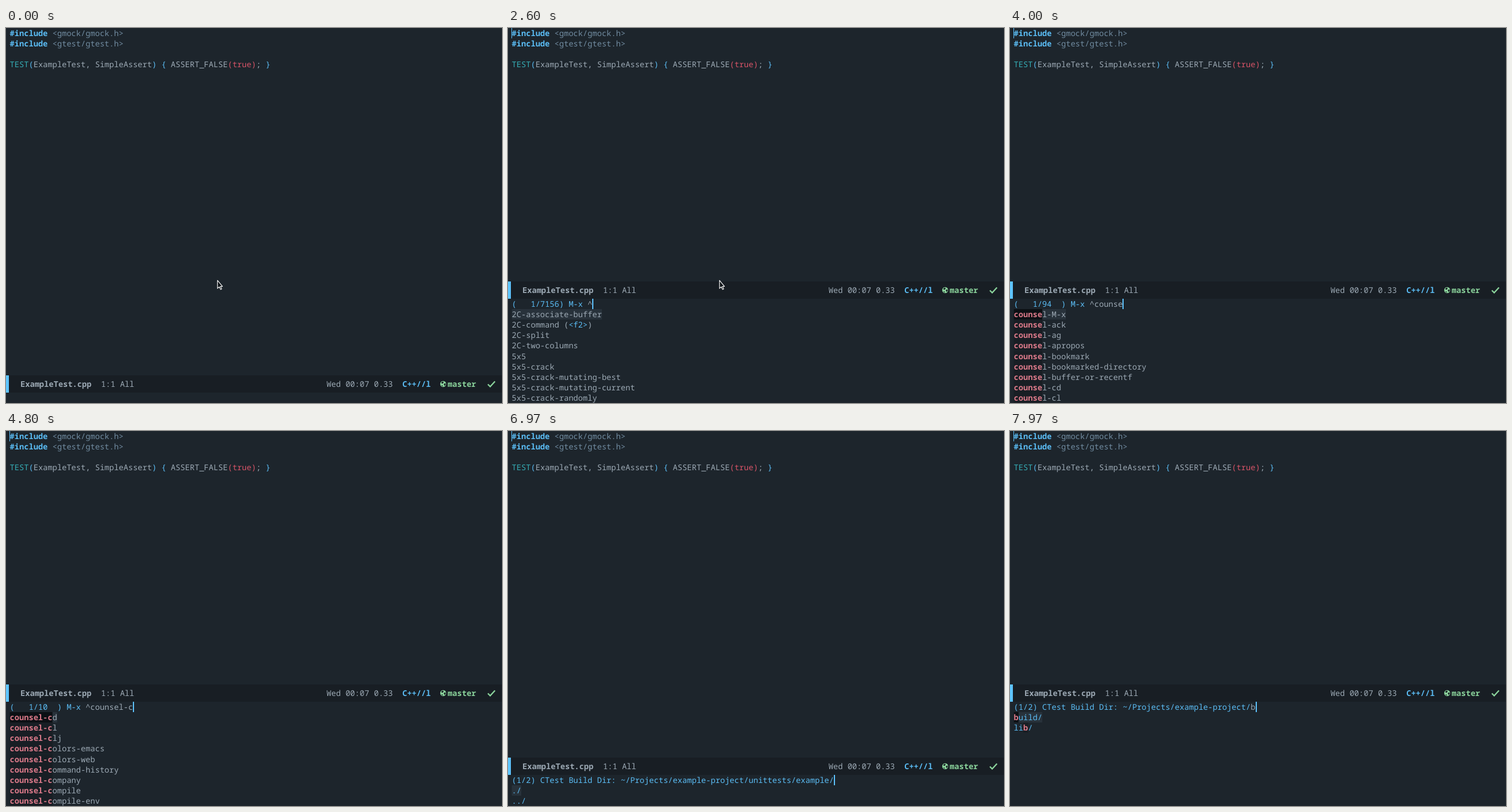
An HTML page that plays this animation: 860x651 px, repeating every 8000 ms.

```html
<!DOCTYPE html>
<html lang="en">
<head>
<meta charset="utf-8">
<title>Editor session</title>
<style>
html, body { margin: 0; width: 100%; height: 100%; overflow: hidden; background: #1d252c; }
svg { display: block; }
text {
  font: 13.7px "Noto Sans Mono", "Liberation Mono", monospace;
  font-variant-ligatures: none;
  text-rendering: geometricPrecision;
  white-space: pre;
}
.fg { fill: #9ca9b4; }
.blue { fill: #5bbdf5; }
.dim { fill: #718ca1; }
.teal { fill: #35acb4; }
.red { fill: #d95468; }
.green { fill: #8bd49c; }
.pink { fill: #dc7a8a; }
.bold { font-weight: 600; }
</style>
</head>
<body>
<svg id="stage" width="860" height="651" viewBox="0 0 860 651">
  <rect width="860" height="651" fill="#1d252c"/>
  <g id="code"></g>
  <rect id="point" x="6" y="0" height="18" fill="#5ec4ff"/>
  <g id="bar">
    <rect width="860" height="30" fill="#181e24"/>
    <rect width="5" height="30" fill="#5ec4ff"/>
    <g id="labels"></g>
    <circle cx="758" cy="15" r="5.2" fill="#8bd49c"/>
    <path d="M754.5 12.5l3-2 1.5 1.5-2 2.5-1.5-.5zM759 15l3-1.5.5 2.5-2 2.5zM755 17l2 .5.5 2-1.5-.5z" fill="#181e24"/>
    <path d="M835.5 15.5l4 4 8.3-9" fill="none" stroke="#8bd49c" stroke-width="2.3"/>
  </g>
  <g id="mini"></g>
  <rect id="caret" width="2" height="18" fill="#5ec4ff"/>
  <path id="mouse" d="M366.7 438.2V452.2L369.8 449.4L372.2 454L374 453.1L371.8 448.6H375.4Z"
    fill="#11161a" stroke="#fff" stroke-width="1.1" stroke-linejoin="round"/>
</svg>
<script>
const LOOP = 8000, LEFT = 6.6, PITCH = 8.22, ROW = 18.1, BASE = 14;
const $ = id => document.getElementById(id);
const esc = s => s.replace(/&/g, "&amp;").replace(/</g, "&lt;");

// A line is a list of [text, classes] pairs.
const line = (x, y, parts) => `<text x="${x}" y="${y}">` +
  parts.map(([s, c]) => `<tspan class="${c}">${esc(s)}</tspan>`).join("") + "</text>";
const box = (col, n, y, fill) =>
  `<rect x="${LEFT + col * PITCH}" y="${y}" width="${n * PITCH}" height="18" fill="${fill}"/>`;

const include = lib => [["#include", "blue bold"], [` <${lib}.h>`, "dim"]];
const source = [
  include("gmock/gmock"),
  include("gtest/gtest"),
  [],
  [["TEST", "teal"], ["(", "blue"], ["ExampleTest, SimpleAssert", "fg"], [")", "blue"],
   [" { ", "blue"], ["ASSERT_FALSE", "fg"], ["(true)", "red"], ["; ", "fg"], ["}", "blue"]]
];
$("code").innerHTML = source.map((p, i) => line(LEFT, Math.round(i * ROW) + BASE, p)).join("");
$("labels").innerHTML = [
  [25, "ExampleTest.cpp", "fg bold"], [164.8, "1:1 All", "fg"], [555.8, "Wed 00:07 0.33", "fg"],
  [687.2, "C++//l", "blue bold"], [765.8, "master", "green bold"]
].map(([x, s, c]) => line(x, 20, [[s, c]])).join("");

const all = ["2C-associate-buffer", "2C-command (<f2>)", "2C-split", "2C-two-columns", "5x5",
  "5x5-crack", "5x5-crack-mutating-best", "5x5-crack-mutating-current", "5x5-crack-randomly"];
const startC = ["c++-mode", "c-mode", "c-set-style", "calc", "calculator", "calendar",
  "capitalize-region", "cd", "center-line"];
const startCo = ["ConTeXt-mode (context-mode)", "column-number-mode", "comint-accumulate",
  "comint-append-output-to-file", "comint-backward-matching-input", "comint-bol",
  "comint-bol-or-process-mark", "comint-clear-buffer", "comint-continue-subjob"];
const counsel = ["M-x", "ack", "ag", "apropos", "bookmark", "bookmarked-directory",
  "buffer-or-recentf", "cd", "cl"].map(s => "counsel-" + s);
const counselC = ["d", "l", "lj", "olors-emacs", "olors-web", "ommand-history",
  "ompany", "ompile", "ompile-env"].map(s => "counsel-c" + s);
const ctest = ["counsel-ctest"];

const command = (at, input, total, items) => ({
  at, input: "^" + input, match: input, items, rows: 10,
  prompt: `(   1/${String(total).padEnd(4)}) M-x `
});
const folder = (at, path, items, rows, input = "") => ({
  at, input, match: input, items, rows,
  prompt: `(1/${items.length}) CTest Build Dir: ~/Projects/example-project/${path}`
});

const states = [
  { at: 0, rows: 1 },
  command(2600, "", 7156, all),
  command(3370, "c", 711, startC),
  command(3470, "co", 307, startCo),
  command(3640, "cou", 98, counsel),
  command(3740, "coun", 96, counsel),
  command(3840, "couns", 94, counsel),
  command(3940, "counse", 94, counsel),
  command(4040, "counsel", 94, counsel),
  command(4300, "counsel-", 93, counsel),
  command(4600, "counsel-c", 10, counselC),
  command(4870, "counsel-ct", 1, ctest),
  command(5010, "counsel-cte", 1, ctest),
  command(5160, "counsel-ctes", 1, ctest),
  command(5370, "counsel-ctest", 1, ctest),
  { ...command(5870, "counsel-ctest", 1, ctest), home: true },
  folder(6010, "unittests/example/", ["./", "../"], 3),
  folder(7140, "unittests/", ["./", "../", "example/"], 4),
  folder(7400, "", ["./", "../", ".git/", "build/", "example/", "lib/", "src/", "test/", "unittests/"], 10),
  folder(7700, "", ["build/", "lib/"], 10, "b")
];
const hidden = [[0, 170], [670, 1170], [1670, 2170], [3140, 3370], [6510, 6970]];

function candidate(s, i, y, match) {
  const tone = s.endsWith("/") ? "blue" : "fg";
  const at = match ? s.toLowerCase().indexOf(match) : -1;
  let out = i ? "" : box(0, s.length, y, "#28323b");
  let parts;
  if (at < 0) {
    parts = s.split(/(<.*?>)/).map(p => [p, p[0] === "<" ? "blue" : tone]);
  } else {
    const end = at + match.length;
    out += box(at, match.length, y, i ? "#181e24" : "#0c1014");
    parts = [[s.slice(0, at), tone], [s.slice(at, end), "pink bold"], [s.slice(end), tone]];
  }
  return out + line(LEFT, y + BASE, parts);
}

let shown;
function layout(state) {
  const top = Math.round(651 - state.rows * ROW);
  $("bar").setAttribute("transform", `translate(0 ${top - 30})`);
  const active = !!state.prompt;
  $("point").setAttribute("width", active ? 1 : 2);
  $("mini").innerHTML = active ? line(LEFT, top + BASE, [[state.prompt, "blue"], [state.input, "fg"]]) +
    state.items.map((s, i) => candidate(s, i, Math.round(top + (i + 1) * ROW), state.match)).join("") : "";
  if (active) {
    const col = state.home ? 0 : state.prompt.length + state.input.length;
    $("caret").setAttribute("x", Math.round(LEFT - 0.2 + col * PITCH));
    $("caret").setAttribute("y", top);
  }
}

const show = (id, on) => $(id).setAttribute("visibility", on ? "visible" : "hidden");
function draw(t) {
  const state = states.filter(s => s.at <= t).pop();
  if (state !== shown) layout(shown = state);
  const lit = !hidden.some(([a, b]) => t >= a && t < b);
  show("point", state.prompt || lit);
  show("caret", state.prompt && lit);
  show("mouse", t < 3370);
}

const start = performance.now();
function tick() {
  draw((performance.now() - start) % LOOP);
  requestAnimationFrame(tick);
}
tick();
</script>
</body>
</html>
```
